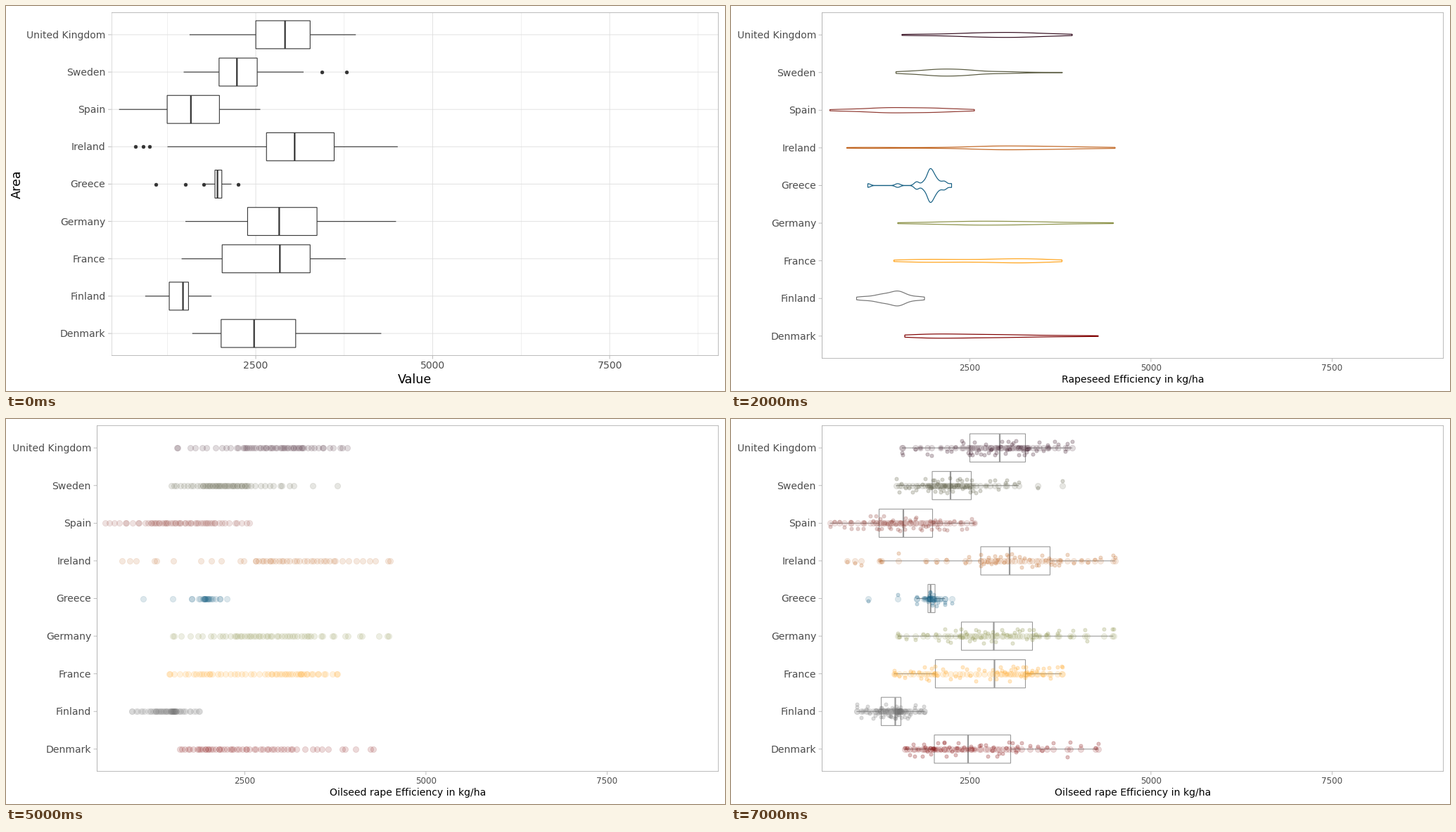
Recreate the animation shown at these times as a matplotlib script. Size 1022x548 px, loop 8000 ms.

```python
import matplotlib.pyplot as plt
import numpy as np
from matplotlib.animation import FuncAnimation
from matplotlib.patches import Rectangle

W, H, DPI = 1022, 548, 100
PT = 72 / DPI
TOP, RIGHT = 9, 1013
LINE, THIN = 1.1, .87
BORDER, LABEL, GRID = "#b3b3b3", "#4d4d4d", "#dedede"

plt.rcParams["font.family"] = "DejaVu Sans"
fig = plt.figure(figsize=(W / DPI, H / DPI), dpi=DPI, facecolor="white")
ax = fig.add_axes([0, 0, 1, 1])


class Layout:
    """Panel edges and the mapping from data to stage pixels."""

    def __init__(self, left, bottom):
        self.left, self.bottom = left, bottom
        self.pitch = (bottom - TOP) / 9.2
        self.scale = (RIGHT - left) / (RIGHT - 129.1)

    def x(self, v):
        return RIGHT - (RIGHT - np.asarray(v)) * self.scale

    def y(self, i):
        return TOP + self.pitch * (i + .6)

    def tick(self, kg):
        return self.x(81.9 + .103 * kg)


FIRST, WIDE = Layout(149.6, 498), Layout(129.1, 502)


class Area:
    """Five-number summary in wide-panel pixels, filled up with samples."""

    def __init__(self, name, hue, deep, box, outliers=(), quarter=14):
        self.name, self.hue, self.deep = name, hue, deep
        self.box, self.outliers = box, outliers
        rng = np.random.default_rng(len(name) + int(box[2]))

        def spread(a, b, n, power=1):
            u = (np.arange(n) + rng.random(n)) / n
            return a + (b - a) * u ** power

        lo, q1, med, q3, hi = box
        low = sum(o < med for o in outliers)
        high = len(outliers) - low
        self.x = np.concatenate([
            [lo, hi], outliers,
            spread(q1, lo, quarter - low - 1, 1.5),
            spread(q1, med, quarter), spread(med, q3, quarter),
            spread(q3, hi, quarter - high - 1, 1.5)])
        self.shift = rng.uniform(-.2, .2, len(self.x)) * WIDE.pitch

    def span(self):
        return self.x.min(), self.x.max()

    def density(self):
        n, iqr = len(self.x), self.box[3] - self.box[1]
        width = .9 * min(self.x.std(), iqr / 1.34) * n ** -.2
        grid = np.linspace(*self.span(), 400)
        z = (grid[:, None] - self.x) / width
        return grid, np.exp(-z * z / 2).mean(axis=1) / width


AREAS = [
    Area("United Kingdom", "#FF61C3", "#350E20",
         (243, 339.5, 382, 418.5, 485)),
    Area("Sweden", "#DB72FB", "#58593F",
         (234.5, 286, 312, 341.5, 409), (435.5, 471)),
    Area("Spain", "#619CFF", "#8F3931",
         (140.5, 210.5, 245, 286.5, 346)),
    Area("Ireland", "#00B9E3", "#C16622",
         (211, 355, 396, 453.5, 546), (164.5, 175.5, 185), 12),
    Area("Greece", "#00C19F", "#155F83",
         (264, 280, 283.7, 290, 304), (194.5, 237, 264, 313.5), 6),
    Area("Germany", "#00BA38", "#8A9045",
         (237, 327.5, 373.5, 428.5, 543.5)),
    Area("France", "#93AA00", "#FFA319",
         (231.5, 290.5, 374.5, 418.5, 470.5)),
    Area("Finland", "#D39200", "#767676",
         (178.5, 213.5, 233.5, 241.5, 275)),
    Area("Denmark", "#F8766D", "#800000",
         (247, 289, 337, 397.5, 522)),
]


def line(xs, ys, color, px, z=3, cap="butt"):
    ax.plot(xs, ys, color=color, lw=px * PT, zorder=z,
            solid_capstyle=cap, snap=False)


def text(x, y, s, px, color, ha="center", va="baseline", **kw):
    ax.text(x, y, s, fontsize=px * PT, color=color, ha=ha, va=va, **kw)


def dots(x, y, r, color, alpha=1, z=5):
    ax.scatter(x, np.broadcast_to(y, np.shape(x)), s=(2 * r * PT) ** 2,
               color=color, alpha=alpha, linewidths=.75 * PT, zorder=z)


def panel(lay, title, tick_px, title_px, tick_y, title_y):
    edge = Rectangle((lay.left, TOP), RIGHT - lay.left, lay.bottom - TOP,
                     fill=False, ec=BORDER, lw=2 * THIN * PT, zorder=9,
                     snap=False)
    ax.add_patch(edge)
    edge.set_clip_path(edge)
    for kg in (2500, 5000, 7500):
        x = lay.tick(kg)
        line([x, x], [lay.bottom, lay.bottom + 4.5], BORDER, THIN)
        text(x, tick_y, str(kg), tick_px, LABEL)
    for i, area in enumerate(AREAS):
        y = lay.y(i)
        line([lay.left - 4.5, lay.left], [y, y], BORDER, THIN)
        text(lay.left - 8.1, y + 5, area.name, 14, LABEL, "right")
    text((lay.left + RIGHT) / 2, title_y, title, title_px, "black")


def grid(lay):
    for kg in range(1250, 9000, 1250):
        x = lay.tick(kg)
        px = THIN / 2 if kg % 2500 else THIN
        line([x, x], [TOP, lay.bottom], GRID, px, 1)
    for i in range(len(AREAS)):
        line([lay.left, RIGHT], [lay.y(i)] * 2, GRID, THIN, 1)


def boxplots(lay, color=None, outlier_r=0):
    half = .375 * lay.pitch
    for i, area in enumerate(AREAS):
        c, y = color or area.hue, lay.y(i)
        lo, q1, med, q3, hi = lay.x(area.box)
        line([lo, q1], [y, y], c, LINE)
        line([q3, hi], [y, y], c, LINE)
        ax.add_patch(Rectangle((q1, y - half), q3 - q1, 2 * half, fc="white",
                               ec=c, lw=LINE * PT, zorder=3, snap=False))
        line([med, med], [y - half, y + half], c, 2 * LINE, 4)
        if outlier_r:
            dots(lay.x(area.outliers), y, outlier_r, c)


def violins():
    shapes = [area.density() for area in AREAS]
    unit = .45 * WIDE.pitch / max(d.max() for _, d in shapes)
    for i, (x, d) in enumerate(shapes):
        y = WIDE.y(i)
        ax.fill(np.r_[x, x[::-1]], np.r_[y - unit * d, y + unit * d[::-1]],
                fc="white", ec=AREAS[i].deep, lw=1.2 * PT, zorder=3)


def ranges():
    for i, area in enumerate(AREAS):
        line(area.span(), [WIDE.y(i)] * 2, area.deep, 7.5, cap="round")


def strips(alpha):
    for i, area in enumerate(AREAS):
        dots(area.x, WIDE.y(i), 4.1, area.deep, alpha)


def jitter():
    for i, area in enumerate(AREAS):
        dots(area.x, WIDE.y(i) + area.shift, 2.6, area.deep, .25, 6)


def draw(step):
    ax.clear()
    ax.set(xlim=(0, W), ylim=(H, 0))
    ax.axis("off")
    if step == 0:
        grid(FIRST)
        panel(FIRST, "Value", 14, 17.5, 516, 537)
        text(16, 253.5, "Area", 17.5, "black", rotation=90, va="center")
        boxplots(FIRST, "#333333", 2.3)
        return []
    crop = "Rapeseed" if step < 4 else "Oilseed rape"
    panel(WIDE, crop + " Efficiency in kg/ha", 12, 14, 519, 536)
    if step == 1:
        boxplots(WIDE, outlier_r=2.5)
    elif step == 2:
        violins()
    elif step == 3:
        ranges()
    else:
        strips(1 if step == 4 else .15)
    if step >= 6:
        boxplots(WIDE, "#999999")
    if step == 7:
        jitter()
    return []


anim = FuncAnimation(fig, draw, frames=8, init_func=lambda: draw(0),
                     interval=1000, repeat=True, repeat_delay=0, blit=False)
plt.show()
```
